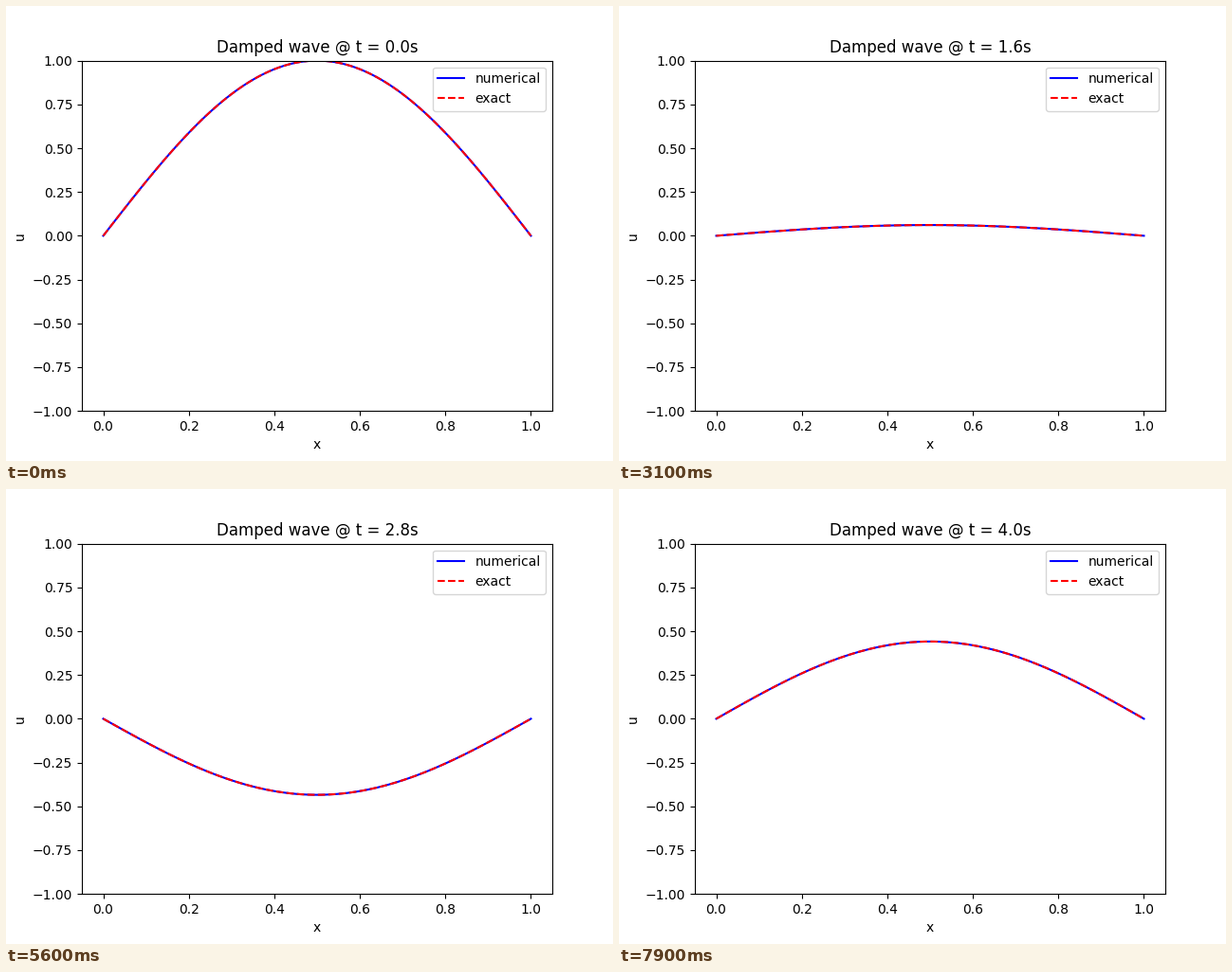
These frames come from a looping animation (640x480 px, 8000 ms). A matplotlib script:

```python
import matplotlib.pyplot as plt
import numpy as np
from matplotlib.animation import FuncAnimation

FRAMES, INTERVAL = 80, 100
STEPS_PER_SECOND = 20
DECAY = 0.2
OMEGA = np.sqrt(np.pi**2 - DECAY**2)

x = np.linspace(0, 1, 101)
shape = np.sin(np.pi * x)


def wave(t):
    """Standing wave released from rest with light damping."""
    swing = np.cos(OMEGA * t) + DECAY / OMEGA * np.sin(OMEGA * t)
    return np.exp(-DECAY * t) * swing * shape


fig, ax = plt.subplots(figsize=(6.4, 4.8), dpi=100)
numerical, = ax.plot(x, wave(0), "b-", label="numerical")
exact, = ax.plot(x, wave(0), "r--", label="exact")
ax.set_xlim(-0.05, 1.05)
ax.set_ylim(-1, 1)
ax.set_xlabel("x")
ax.set_ylabel("u")
ax.legend(loc="upper right")
title = ax.set_title("")


def update(i):
    t = i / STEPS_PER_SECOND
    u = wave(t)
    numerical.set_ydata(u)
    exact.set_ydata(u)
    title.set_text(f"Damped wave @ t = {t:.1f}s")
    return numerical, exact, title


anim = FuncAnimation(fig, update, frames=FRAMES, interval=INTERVAL,
                     repeat=True, repeat_delay=0, blit=False)
plt.show()
```
